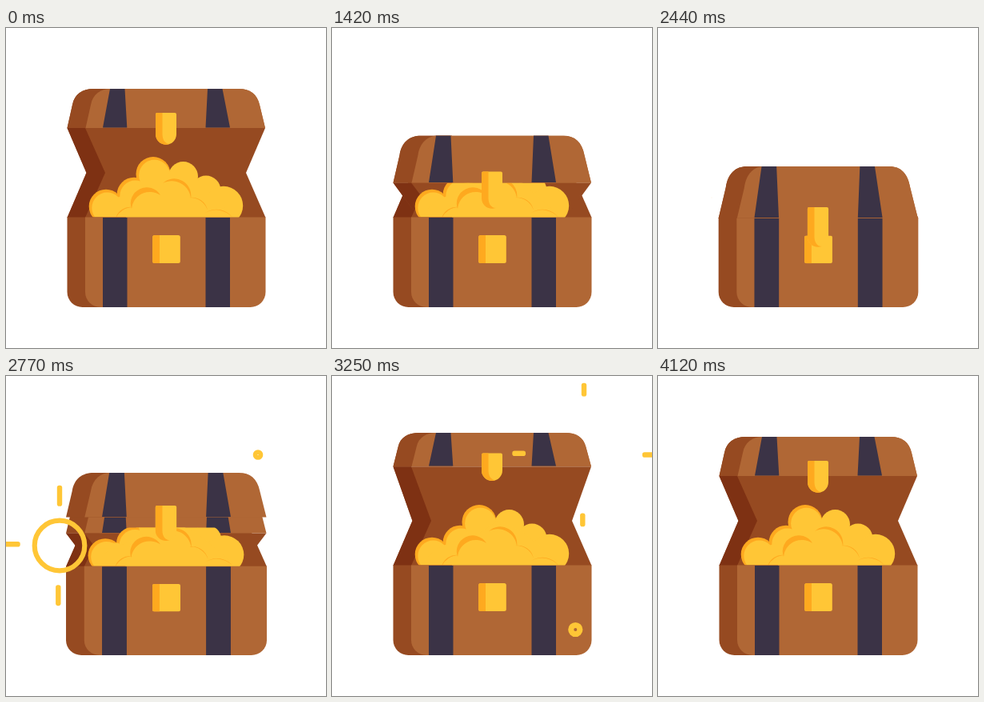
Animation of 400 by 400 pixels, one loop 4150 ms. Source, as an HTML page:

```html
<!DOCTYPE html>
<html lang="en">
<head>
<meta charset="utf-8">
<title>Treasure chest</title>
<style>
  html, body { margin: 0; width: 100%; height: 100%; overflow: hidden; background: #fff; }
  svg { display: block; width: 100%; height: 100%; }
  .wood { fill: #b06735; }
  .side { fill: #964a21; }
  .shade { fill: #7e3113; }
  .strap { fill: #3b3346; }
  .gold { fill: #ffc636; }
  .amber { fill: #fea91f; }
</style>
</head>
<body>
<svg viewBox="0 0 400 400">
  <defs>
    <clipPath id="goldClip"><rect id="goldRect" x="60" y="0" width="280" height="237"/></clipPath>
    <clipPath id="plate"><rect x="183.2" y="259" width="34.6" height="35" rx="2.5"/></clipPath>
  </defs>
  <g id="chest">
    <path class="side" d="M76.5 237L100.500 181H300L324.500 237Z"/>
    <path class="shade" d="M76.500 237L100.500 181H124L99 237Z"/>
    <path class="side" id="inside"/>
    <path class="shade" id="insideShade"/>
    <g id="backLid"></g>
    <g clip-path="url(#goldClip)"><g id="coins"></g></g>
    <path class="side" d="M76.500 236.500H150V349H95.500a19 19 0 0 1-19-19Z"/>
    <path class="wood" d="M99 236.500H324.500V330a19 19 0 0 1-19 19H118a19 19 0 0 1-19-19Z"/>
    <path class="strap" d="M121 237h30.500v112H121ZM249.500 237H280v112h-30.500Z"/>
    <g clip-path="url(#plate)">
      <path class="gold" d="M183 259h35v35h-35Z"/>
      <path class="amber" d="M183 259h9v35h-9Z"/>
    </g>
    <g id="frontLid"></g>
    <path class="gold" id="clasp"/>
    <path class="amber" id="claspShade"/>
  </g>
  <g id="bursts" class="gold"></g>
</svg>
<script>
const LOOP = 4150;
const LAG = 55;
const $ = id => document.getElementById(id);
const set = (el, attrs) => { for (const k in attrs) el.setAttribute(k, attrs[k]); };
const make = (tag, parent, attrs = {}) => {
  const el = document.createElementNS('http://www.w3.org/2000/svg', tag);
  set(el, attrs);
  return parent.appendChild(el);
};
const clamp = u => Math.min(1, Math.max(0, u));
const out = (u, p) => 1 - Math.pow(1 - clamp(u), p);

const easeIn = u => u * u;
const easeOut = u => out(u, 2);
const easeBoth = u => (1 - Math.cos(Math.PI * u)) / 2;

// Keys are [time, value, easing towards this key].
function track(keys, t) {
  const i = keys.findIndex(k => k[0] > t);
  if (i < 0) return keys[keys.length - 1][1];
  if (i === 0) return keys[0][1];
  const [t0, v0] = keys[i - 1], [t1, v1, ease = easeBoth] = keys[i];
  return v0 + (v1 - v0) * ease((t - t0) / (t1 - t0));
}

const OPEN = [[0, 1], [1030, 1], [1530, 0, easeIn], [2620, 0], [3130, 1.1, easeOut],
  [3250, 1.107], [3560, 0.985], [3900, 1]];
const SQUASH = [[0, 0], [1500, 0], [1640, 0.026], [1810, -0.011], [2020, 0.006], [2230, 0],
  [2380, 0], [2560, 0.026], [2770, 0.012], [2950, -0.008], [3200, 0], [3600, 0.003], [4120, 0]];

// Coins: amber discs with a shifted yellow disc on top, plus inner crescents.
function buildCoins() {
  const box = $('coins');
  const disc = (cls, cx, cy, r) => make('circle', box, { class: cls, cx, cy, r });
  const rimmed = [[125, 223, 21.3], [160, 208, 21.3], [184, 182.500, 21.500]];
  rimmed.forEach(([x, y, r]) => disc('amber', x, y, r));
  rimmed.forEach(([x, y, r]) => disc('gold', x + 1.6, y + 1.8, r - 2));
  [[221.500, 185.500, 18.500], [250, 203, 18.500], [272, 222, 24.200]].forEach(c => disc('gold', ...c));
  make('path', box, { class: 'gold', d: 'M109 238L128 217L160 203L184 196L208 180L240 196L262 215L290 238Z' });
  const crescent = (x0, y0, r0, x1, y1, r1) => make('path', box, {
    class: 'amber', d: `M${x0} ${y0}A${r0} ${r0} 0 0 1 ${x1} ${y1}A${r1} ${r1} 0 0 0 ${x0} ${y0}Z`
  });
  crescent(157, 226, 20, 193, 209, 23);
  crescent(196, 194, 21, 231, 213, 24);
  crescent(229, 212, 20, 252, 228, 23);
  crescent(137, 238, 19, 159, 224, 24);
  crescent(249, 231, 25, 284, 238, 27);
}

function buildLid(group) {
  return ['side', 'wood', 'strap'].map(cls => make('path', group, { class: cls }));
}

function lidBox(k) {
  const top = 172 - 96 * (k > 1 ? 1 + (k - 1) / 2 : k);
  const base = 237 - 112 * k;
  return { k, top, base, h: base - top };
}

function drawLid([side, wood, strap], { k, top, base, h }) {
  const c = 2.5 * (1 - k), knee = top + 0.41 * h, bend = top + 0.13 * h;
  const edge = (x, s) => `M${x} ${base}L${x + 6.5 + c} ${knee}C${x + 9 + c} ${bend} ${x + 19 + c} ${top} ${x + s + c} ${top}`;
  const right = `H${291 - c}C${305 - c} ${top} ${314 - c} ${bend} ${317 - c} ${knee}L324 ${base}Z`;
  side.setAttribute('d', edge(76.5, 33) + `H150V${base}Z`);
  wood.setAttribute('d', edge(99.5, 31) + right);
  const end = base - 0.6;
  strap.setAttribute('d', `M130 ${top}H148.500L151.300 ${end}H121ZM252 ${top}H270.500L280 ${end}H249.500Z`);
}

function drawInside(k) {
  const y = 237 - 112 * k;
  const tip = y + Math.max(18 + 38 * k, 181 - y);
  $('inside').setAttribute('d', `M76.500 ${y}H324L300 ${tip}H100.500Z`);
  $('insideShade').setAttribute('d', `M76.500 ${y}H99L124 ${tip}H100.500Z`);
}

function drawClasp({ k, top, h }) {
  const q = Math.min(k, 1);
  const y = top + h * (0.79 - 0.18 * q * q);
  const b = y + h * (0.77 + 0.045 * q), m = b - 13;
  $('clasp').setAttribute('d', `M187 ${y + 2}q0-2 2-2H211q2 0 2 2V${m}a13 13 0 0 1-26 0Z`);
  $('claspShade').setAttribute('d',
    `M187 ${y + 2}q0-2 2-2H195.500V${m}C195.500 ${m + 7} 199 ${b - 1} 204.500 ${b - 0.8}Q202 ${b} 200 ${b}A13 13 0 0 1 187 ${m}Z`);
}

const bursts = [[67, 212, 2440], [315, 98.5, 2740], [304.3, 317, 3205]].map(([x, y, start]) => {
  const group = make('g', $('bursts'), { transform: `translate(${x} ${y})` });
  const ring = make('circle', group, { fill: 'none', stroke: '#ffc636' });
  const rays = [0, 90, 180, 270].map(a => make('rect', group, {
    transform: `rotate(${a})`, y: a === 90 || a === 180 ? -1.5 : -3.2, height: 6.4, rx: 2.8
  }));
  return { group, ring, rays, start };
});

function drawBurst({ group, ring, rays, start }, t) {
  const age = t - start;
  group.style.display = age > 0 && age < 700 ? '' : 'none';
  const R = 35 * out(age / 420, 2.6);
  const r = Math.min(R, 35 * out((age - 25) / 395, 1.1));
  set(ring, { r: (R + r) / 2, 'stroke-width': R - r });
  ring.style.display = age < 420 ? '' : 'none';
  const far = 30 + 61 * out((age - 150) / 500, 3);
  const near = 30 + 61 * out((age - 200) / 500, 1.25);
  rays.forEach(ray => set(ray, { x: near, width: Math.max(0, far - near) }));
}

buildCoins();
const back = buildLid($('backLid')), front = buildLid($('frontLid'));

function draw(t) {
  const k = track(OPEN, t);
  const late = t > 2380 ? Math.min(k, track(OPEN, t - LAG)) : k;
  const lid = lidBox(k), rear = lidBox(late);
  const s = track(SQUASH, t);
  $('chest').setAttribute('transform',
    `translate(200.500 349) scale(${1 + s} ${1 - 0.85 * s}) translate(-200.500 -349)`);
  drawInside(late);
  drawLid(back, rear);
  drawLid(front, lid);
  drawClasp(lid);
  const cut = Math.min(237, lid.base + 0.65 * (rear.base - lid.base));
  set($('goldRect'), { y: cut, height: 237 - cut });
  bursts.forEach(b => drawBurst(b, t));
}

const begin = performance.now();
function tick() {
  draw((performance.now() - begin) % LOOP);
  requestAnimationFrame(tick);
}
tick();
</script>
</body>
</html>
```
